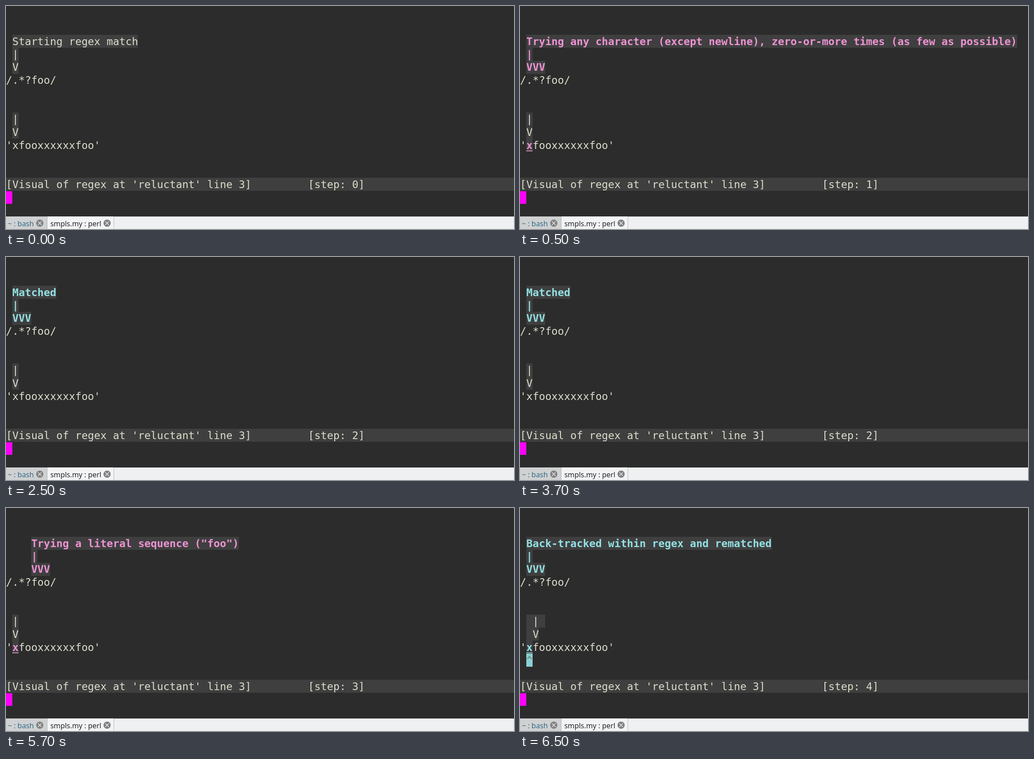
Write an HTML page with a canvas that moves like this. It is 1128 by 496 pixels and loops after 8 s.

```html
<!DOCTYPE html>
<html lang="en">
<head>
<meta charset="utf-8">
<title>Regex debugger</title>
<style>
  html, body { margin: 0; width: 100%; height: 100%; overflow: hidden; background: #2c2c2c; }
  canvas { display: block; }
</style>
</head>
<body>
<canvas id="stage" width="1128" height="496"></canvas>
<script>
const ctx = document.getElementById('stage').getContext('2d');
const CELL = 13.975, LINE = 28.91, TOP = 64;
const FG = '#dcdccc', SHADE = '#3f3f3f', PINK = '#ec93d3', CYAN = '#93e0e3';

// One entry per debugger step: start time, message, colour, regex column and arrow
const steps = [
  { at: 0, text: 'Starting regex match', color: FG, col: 1, arrow: 'V' },
  { at: 500, text: 'Trying any character (except newline), zero-or-more times (as few as possible)',
    color: PINK, col: 1, arrow: 'VVV', mark: true },
  { at: 2500, text: 'Matched', color: CYAN, col: 1, arrow: 'VVV' },
  { at: 4500, text: 'Trying a literal sequence ("foo")', color: PINK, col: 4, arrow: 'VVV', mark: true },
  { at: 6500, text: 'Back-tracked within regex and rematched', color: CYAN, col: 1, arrow: 'VVV',
    mark: true, consumed: true }
];

function rect(x, y, w, h, color) {
  ctx.fillStyle = color;
  ctx.fillRect(x, y, w, h);
}

function put(row, col, text, { color = FG, bold = false, bg } = {}) {
  const x = col * CELL, y = TOP + row * LINE;
  if (bg) {
    const left = Math.round(x), top = Math.round(y);
    rect(left, top, Math.round(x + text.length * CELL) - left, Math.round(y + LINE) - top, bg);
  }
  ctx.font = `${bold ? 'bold ' : ''}23.21px "DejaVu Sans Mono", monospace`;
  ctx.fillStyle = color;
  ctx.fillText(text, x, y + 22.6);
}

function tab(x, label, color, closeX) {
  ctx.font = '15.9px "Noto Sans", sans-serif';
  ctx.fillStyle = color;
  ctx.fillText(label, x, 490);
  ctx.fillStyle = '#808182';
  ctx.beginPath();
  ctx.arc(closeX, 483, 8, 0, 7);
  ctx.fill();
  ctx.strokeStyle = '#eff0f1';
  ctx.lineWidth = 1.2;
  ctx.beginPath();
  for (const s of [-1, 1]) {
    ctx.moveTo(closeX - 4, 483 - 4 * s);
    ctx.lineTo(closeX + 4, 483 + 4 * s);
  }
  ctx.stroke();
}

function drawTabs() {
  rect(0, 468, 1128, 28, '#eff0f1');
  rect(0, 468, 91, 28, '#d0d1d2');
  rect(0, 468, 1128, 1, '#c4c6c7');
  rect(91, 468, 1, 28, '#b5b7b8');
  rect(92, 468, 148, 28, '#f3f4f5');
  rect(239, 468, 1, 28, '#b5b7b8');
  tab(4, '~ : bash', '#2f6c86', 75);
  tab(98.5, 'smpls.my : perl', '#232629', 224.5);
}

function draw(now) {
  const time = now % 8000;
  const index = steps.findLastIndex(s => time >= s.at);
  const { text, color, col, arrow, mark, consumed } = steps[index];
  const style = { color, bold: color !== FG, bg: SHADE };

  rect(0, 0, 1128, 496, '#2c2c2c');
  put(0, col, text, style);
  put(1, col, '|', style);
  put(2, col, arrow, style);
  put(3, 0, '/.*?foo/');

  put(6, 1, consumed ? ' | ' : '|', { bg: SHADE });
  put(7, 1, consumed ? ' V' : 'V', { bg: SHADE });
  put(8, 0, mark ? "' fooxxxxxxfoo'" : "'xfooxxxxxxfoo'");
  if (mark) {
    put(8, 1, 'x', style);
    rect(14, 321.5, 14, 1.5, color);
  }
  if (consumed) put(9, 1, '^', { color: '#709080', bold: true, bg: '#8cd0d3' });

  rect(0, 382, 1128, 29, SHADE);
  put(11, 0, "[Visual of regex at 'reluctant' line 3]");
  put(11, 48, `[step: ${index}]`);
  rect(0, 412, 14, 28, '#ff00ff');
  drawTabs();
  requestAnimationFrame(draw);
}
requestAnimationFrame(draw);
</script>
</body>
</html>
```
